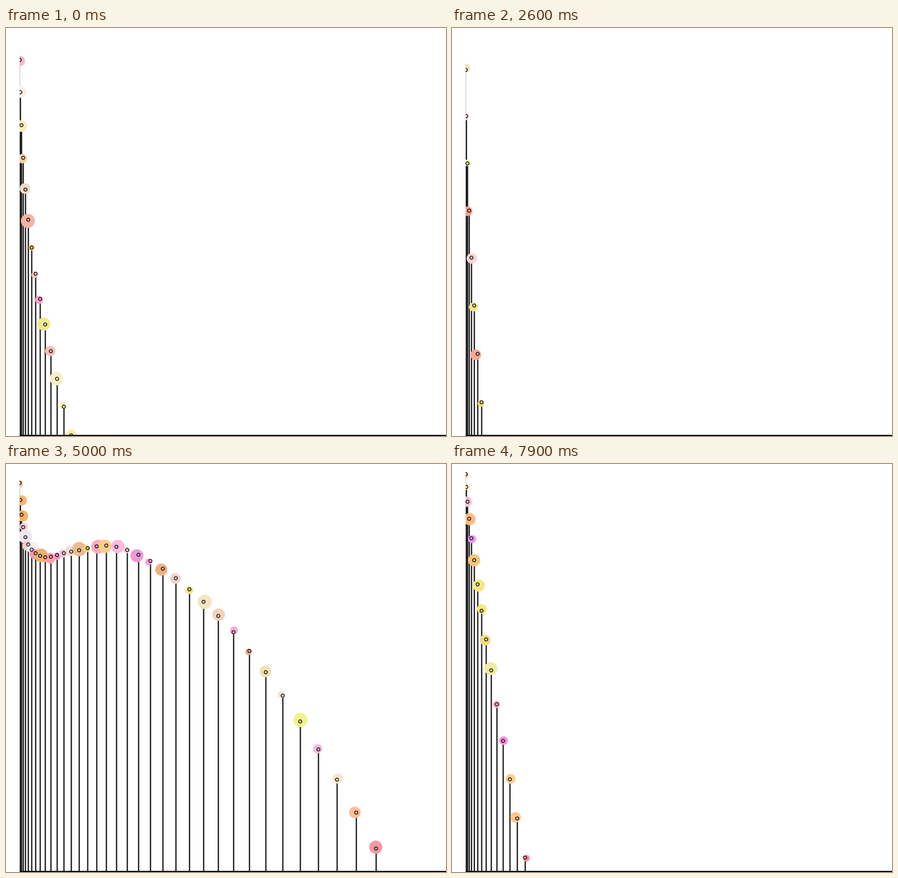
Recreate the animation shown at these times as a matplotlib script. Size 778 by 720 pixels, loop 8000 ms.

```python
import numpy as np
import matplotlib.pyplot as plt
from matplotlib.animation import FuncAnimation
from matplotlib.collections import LineCollection

W, H, DPI = 778, 720, 100
PX = 72 / DPI
LEFT, GROUND = 24, 719
FRAMES, STEP = 80, 100
SPEED = 0.838  # stems the hill scrolls per frame


def curve(ys, step):
    """Smooth cubic curve through evenly spaced values."""
    ys = np.array(ys, float)
    slope = np.gradient(ys)

    def at(x):
        x = np.clip(np.asarray(x) / step, 0, len(ys) - 1)
        i = np.minimum(x.astype(int), len(ys) - 2)
        s = x - i
        bend = (1 - s) * (slope[i] + ys[i] - ys[i + 1])
        bend -= s * (slope[i + 1] + ys[i] - ys[i + 1])
        return (1 - s) * ys[i] + s * ys[i + 1] + s * (1 - s) * bend

    return at


# first flower over time, and the profile that scrolls under the others
top = curve([56, 42, 58, 82, 82, 33, 4, -4, 20], 10)
hill = curve([0, 282, 514, 769, 1072, 1473, 1896, 2310, 2573, 2723, 2772,
              2764, 2756, 2813, 2943, 3172, 3500, 3860], 5)

k = np.arange(37)
x = LEFT + k * (k + 1) / 2

fig = plt.figure(figsize=(W / DPI, H / DPI), dpi=DPI, facecolor="white")
ax = fig.add_axes([LEFT / W, 0, 1 - LEFT / W, 1])
ax.set(xlim=(LEFT, W), ylim=(H, 0))
ax.axis("off")

stems = LineCollection([], linewidths=np.where(k, 2, 1) * PX,
                       colors=np.where(k, "black", "0.75"), zorder=1)
stems.set_snap(False)
ax.add_collection(stems, autolim=False)
petals = ax.scatter(x, x, linewidths=0, zorder=2)
rings = ax.scatter(x, x, s=(5.6 * PX) ** 2, facecolors="none",
                   edgecolors="black", linewidths=1.25 * PX, zorder=3)
ax.plot([LEFT, W], [GROUND, GROUND], color="black", lw=2 * PX, zorder=4)


def draw(t):
    u = SPEED * t
    y = top(t) + hill(u + k) - hill(u)
    tips = np.column_stack([x, y])
    stems.set_segments([[(a + 0.5, min(b, GROUND)), (a + 0.5, GROUND)]
                        for a, b in tips])
    rings.set_offsets(tips + 0.3)

    # every flower gets a fresh size, place and colour
    rng = np.random.default_rng(500 + t)
    petals.set_offsets(tips + rng.uniform(-3, 3, tips.shape))
    petals.set_sizes((2 * PX * rng.uniform(5.5, 12.8, len(k))) ** 2)
    petals.set_facecolor(rng.uniform([0.93, 0.56, 0.38], [1, 0.97, 0.95],
                                     (len(k), 3)))
    return stems, petals, rings


anim = FuncAnimation(fig, draw, frames=FRAMES, interval=STEP,
                     repeat=True, repeat_delay=0)
plt.show()
```
